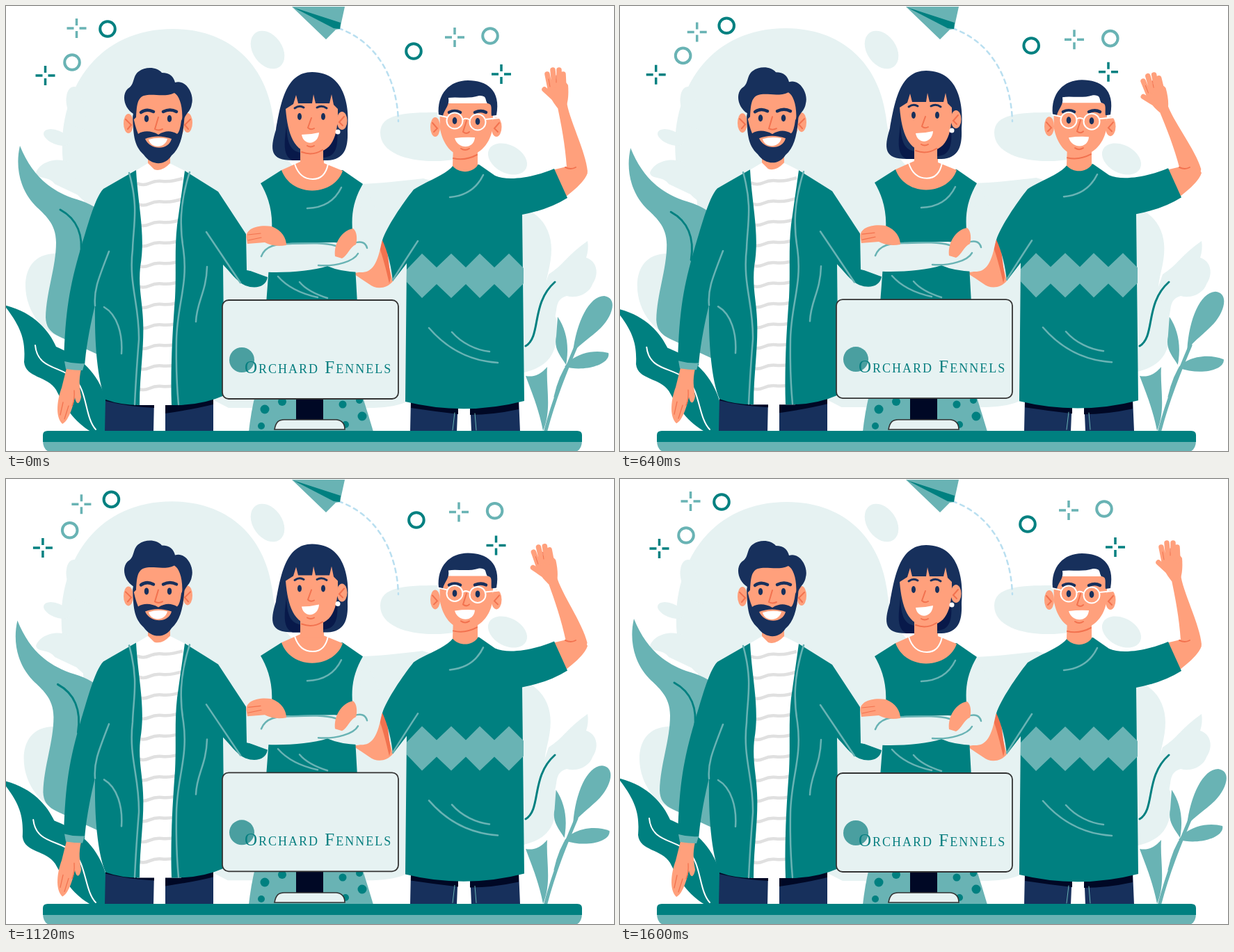
Write an HTML page that moves like this. It is 874x640 px and loops after 2.48 s.

```html
<!DOCTYPE html>
<html lang="en">
<head>
<meta charset="utf-8">
<title>Team</title>
<style>
html, body { margin: 0; width: 874px; height: 640px; overflow: hidden; background: #fff }
svg { display: block }
.teal { fill: #008080 } .mint { fill: #69b3b4 } .pale { fill: #e6f2f2 } .navy { fill: #17305c }
.dark { fill: #000825 } .skin { fill: #ffa07c } .blush { fill: #f2724f } .white { fill: #fff }
.line { fill: none; stroke: #69b3b4; stroke-width: 2.5; stroke-linecap: round }
.line.deep { stroke: #008080; stroke-width: 3 }
.line.light { stroke: #fff; stroke-width: 2 }
.line.warm { stroke: #f2724f; stroke-width: 2 }
.line.brow { stroke: #17305c; stroke-width: 4.5 }
.line.finger { stroke: #ffa07c; stroke-width: 7.5 }
text { font: 25px "Liberation Serif", serif; font-variant: small-caps; letter-spacing: 2px; fill: #087f80 }
</style>
</head>
<body>
<!-- data-move: dx dy angle pivotX pivotY at full swing -->
<svg width="874" height="640" viewBox="0 0 874 640">
<g class="pale">
  <path data-move="-2 -1.2" d="M82 225C72 130 125 33 240 33C322 33 374 85 384 160C395 270 480 262 600 248L742 290C772 300 784 325 784 350C784 375 774 395 776 410L791 450C794 490 789 516 745 527L574 570Q555 578 520 578H320L130 480L112 280Q88 262 82 225Z"/>
  <path data-move="-4 0" d="M72 356C40 356 28 378 28 402C28 440 55 474 88 478L110 350Z"/>
  <path d="M88 170C96 160 84 145 87 130C89 112 105 113 106 124L120 180Z"/>
  <ellipse cx="73" cy="189" rx="20" ry="10" transform="rotate(22 73 189)"/>
  <path d="M90 224C70 217 48 225 43 240C45 250 62 244 70 256L110 275Z"/>
  <ellipse cx="376" cy="63" rx="21" ry="30" transform="rotate(-35 376 63)"/>
  <path d="M538 182C538 155 575 153 620 153L650 220C600 229 538 219 538 182Z"/>
  <ellipse cx="721" cy="220" rx="30" ry="20" transform="rotate(28 721 220)"/>
  <path d="M836 338C807 358 802 372 780 386L772 410L789 448C793 435 789 422 806 417C825 422 840 410 843 400C853 386 850 367 834 362Q838 350 836 338Z"/>
</g>

<path class="line" d="M478 32C530 50 562 100 564 166" stroke-dasharray="6 6" style="stroke:#b9dff0"/>
<path class="mint" d="M411 1H487L480 33L474 34L460 48Z"/>
<path class="teal" d="M413 2L481 24L480 33L471 32Z"/>

<g id="icons"></g>

<g data-move="-6 4">
  <path class="mint" d="M20 201C37 243 62 264 95 276C115 282 130 288 140 300L138 504L112 492C78 474 58 474 57 448C58 410 72 376 72 340C72 312 55 300 42 287C20 264 13 232 20 201Z"/>
  <path class="line deep" d="M78 293C102 306 112 330 107 362"/>
</g>
<g data-move="0 0 -2.2 130 610">
  <path class="teal" d="M-3 430C40 440 62 467 72 490C95 500 150 525 150 612H122C97 597 85 577 72 552C60 532 28 535 26 512C28 485 25 465 -3 430Z"/>
  <path class="line light" d="M42 488C45 522 78 518 97 535C117 550 113 592 129 609"/>
</g>

<g class="mint">
  <path d="M747 532C762 535 772 526 778 519C776 548 785 580 772 611C766 580 756 556 747 532Z"/>
  <path data-move="-4 0" d="M793 447C806 466 810 490 805 516C798 504 787 494 791 475Z"/>
  <path class="line" style="stroke-width:5" d="M776 610C788 565 803 528 820 488M790 562Q797 532 810 514"/>
  <path data-move="0 -5 -4 818 492" d="M815 498C820 455 838 417 860 417C880 420 872 446 855 463C840 477 828 484 815 498Z"/>
  <path data-move="0 2 9 806 517" d="M803 519C815 500 845 493 866 499C870 514 835 527 803 519Z"/>
</g>
<path class="line deep" d="M747 489C770 475 754 428 789 397"/>

<!-- waving arm -->
<g data-move="0 0 -13.5 818 240">
  <path class="skin" d="M783 126L806 137C808 160 834 210 836 238Q833 248 820 255L800 240L806 232C804 200 798 170 793 146Z"/>
  <path class="skin" d="M778 112C781 104 802 102 808 114C809 126 808 136 806 142L793 147C786 138 779 128 778 112Z"/>
  <path class="line finger" d="M786 131L774 120M782 118L778 98M788 114L786 92M795 114L795 92M802 118L801 98"/>
  <path class="line warm" d="M782 116L780 105M791 110V100" style="stroke-width:1"/>
</g>
<path class="skin" d="M785 236L806 231Q830 225 836 240C832 253 815 266 800 278Z"/>
<path class="line warm" d="M804 232Q812 236 819 232"/>

<!-- man with glasses -->
<g data-move="0 -1">
  <path class="navy" d="M582 565H650L648 612H581ZM667 565H737L739 612H669Z"/>
  <path class="dark" d="M582 568H650V587Q615 583 582 578ZM667 568H737V580Q700 588 667 588Z"/>
  <path class="line" stroke="#5d7aa0" style="stroke-width:1" d="M645 585L642 610M674 586L676 610"/>
  <path class="skin" d="M498 384C520 384 532 370 541 336L556 396C547 407 532 408 522 400Z"/>
  <path class="blush" d="M541 337L547 344L553 391L551 399C546 377 541 359 537 348Z"/>
  <path class="teal" d="M643 229C633 243 604 252 586 264C570 284 547 318 541 337C549 354 554 376 556 396L576 370L574 569Q660 590 745 568L742 300Q780 293 807 276L788 234C760 246 722 253 703 244L680 228Z"/>
  <path class="mint" d="M576 379L598 356L619 376L640 356L661 376L681 356L702 376L723 356L744 377V399L723 420L702 400L681 420L661 400L640 420L619 400L598 420L576 397Z"/>
  <path class="line" d="M638 275Q672 272 686 243M608 463C640 500 675 511 707 513M641 469C655 485 676 495 695 497M592 338Q575 364 556 394"/>
  <path class="skin" d="M643 200H678V229C670 241 651 241 642 230Z"/>
  <path class="line warm" d="M643 219Q660 223 677 214"/>
  <ellipse class="skin" cx="617" cy="174" rx="7" ry="14"/>
  <ellipse class="skin" cx="705" cy="174" rx="7.5" ry="14"/>
  <path class="line warm" d="M613 168L620 176L615 181M709 168L702 176L707 181"/>
  <path class="skin" d="M623 140H701L699 178C695 201 677 216 661 216C640 216 628 198 624 177Z"/>
  <path class="navy" d="M622 157C619 126 638 107 664 107C691 107 712 121 705 157L698 158C697 148 700 141 692 140C688 134 692 129 680 129C665 134 648 130 636 132C638 144 630 148 628 158Z"/>
  <path class="line brow" d="M637 153Q645 149 653 153M674 153Q683 149 690 153"/>
  <ellipse class="navy" cx="645" cy="165" rx="3.3" ry="5"/>
  <ellipse class="navy" cx="678" cy="166" rx="3.3" ry="5"/>
  <path class="line warm" d="M662 165L657 181Q662 185 666 181M654 205Q660 209 666 205"/>
  <path class="white" d="M645 190Q660 188 674 189C673 206 650 207 645 190Z"/>
  <g class="line light"><circle cx="645" cy="165" r="11.5"/><circle cx="678" cy="167" r="11.5"/><path d="M657 163Q662 160 667 164M634 160L621 157M689 163L709 161"/></g>
</g>

<!-- bearded man -->
<g data-move="0 -1">
  <path class="navy" d="M143 565H213L212 612H142ZM229 565H298V612H229Z"/>
  <path class="dark" d="M143 565H213V578Q175 576 143 568ZM229 565H298V573Q270 580 229 586Z"/>
  <path class="white" d="M186 237L206 225L237 227L257 237L252 574H188Z"/>
  <g id="stripes" fill="none" stroke="#e0e0e0" stroke-width="4.5"></g>
  <path class="skin" d="M87 521L108 522C104 540 106 548 108 562C106 574 101 574 99 563C96 578 89 598 81 601C70 590 74 565 80 549Z"/>
  <path class="line warm" style="stroke-width:1.3" d="M98 553Q99 566 95 575M90 575L84 594M82 570L78 588"/>
  <path class="teal" d="M187 236L140 263C127 276 115 325 107 350C91 405 85 440 83 515L113 518C115 490 122 455 128 430C127 490 132 540 143 566Q165 574 192 574C192 530 199 490 197 452C196 425 190 405 193 375C201 330 190 290 187 236Z"/>
  <path class="teal" d="M257 237L305 267L345 328L346 379L376 390C374 403 360 408 344 402C331 396 322 382 312 372L314 560Q280 575 238 574C236 520 240 460 243 420C245 380 242 350 246 315Z"/>
  <path class="mint" d="M84 511Q98 515 113 514L110 524Q98 524 86 522Z"/>
  <path class="line" d="M177 240C191 290 183 315 182 350C176 400 192 430 191 480Q187 530 185 573M264 239C249 285 250 320 255 350C262 400 246 430 245 480Q244 530 248 573M148 353C133 392 126 408 128 431M288 325L337 398M289 375C288 412 274 425 273 454M141 433C160 444 168 472 166 500"/>
  <path class="skin" d="M204 205H236V226Q224 239 213 235L204 226Z"/>
  <ellipse class="skin" cx="176" cy="169" rx="7" ry="14"/>
  <ellipse class="skin" cx="261" cy="168" rx="7" ry="14"/>
  <path class="line warm" d="M172 163L180 171L175 177M265 163L257 171L262 177"/>
  <path class="skin" d="M182 125H255V180Q240 220 218 220T184 180Z"/>
  <path class="navy" d="M183 155C171 148 165 129 175 119C186 113 181 101 191 94C200 87 217 87 224 96C236 96 241 102 243 110C259 105 271 127 267 141C266 149 261 153 258 158L253 167C255 144 249 129 242 125C227 132 211 125 198 129C188 133 188 145 187 160L183 164Z"/>
  <path class="navy" d="M182 154C183 184 183 200 198 214C209 230 229 230 238 215C252 203 255 183 257 154L252 165Q250 181 246 184C237 179 229 179 219 185C209 179 197 179 190 184Q185 172 182 154Z"/>
  <path class="skin" d="M200 191Q218 184 238 191C234 208 207 208 200 191Z"/>
  <path class="white" d="M205 192Q218 188 232 191C228 206 208 205 205 192Z"/>
  <path class="line brow" d="M194 153Q202 147 212 152M226 152Q236 147 245 152"/>
  <ellipse class="navy" cx="202" cy="162" rx="3.2" ry="5"/>
  <ellipse class="navy" cx="235" cy="162" rx="3.2" ry="5"/>
  <path class="line warm" d="M219 160L214 177Q219 180 225 177"/>
</g>

<!-- woman -->
<path class="mint" d="M358 560H512Q520 585 528 612H349Q352 585 358 560Z"/>
<g class="teal"><circle cx="372" cy="580" r="6.5"/><circle cx="397" cy="569" r="6"/><circle cx="367" cy="604" r="5"/><circle cx="484" cy="573" r="5.5"/><circle cx="488" cy="602" r="5"/><circle cx="512" cy="590" r="6.5"/><circle cx="508" cy="567" r="5"/></g>
<g data-move="0 -1.2">
  <path class="teal" d="M366 255L396 236H484L513 256C497 283 495 308 500 338L505 428H374L382 322C384 293 375 270 366 255Z"/>
  <path class="skin" d="M396 236L423 224V205H457V226L484 237C472 273 411 277 396 236Z"/>
  <path class="line" d="M433 291Q468 290 482 261M391 389C405 405 425 414 448 419M422 397C432 409 446 415 462 420"/>
  <path class="pale" d="M346 339Q370 345 402 341L472 340L505 343L513 256Q540 300 541 334C534 375 525 384 508 383Q480 382 462 374C432 384 375 385 346 380Z"/>
  <path class="line" d="M367 360C373 344 390 342 408 342C437 341 458 340 474 345M449 373C475 375 500 367 506 356M500 341Q516 336 519 348"/>
  <path class="skin" d="M346 336C342 320 362 314 382 317C397 323 403 334 403 344Q385 347 372 340L347 342Z"/>
  <path class="line warm" style="stroke-width:1.2" d="M348 329L366 327M348 337L367 333"/>
  <path class="skin" d="M473 360C471 342 482 323 499 320C505 324 505 337 503 343C494 347 491 359 483 363Z"/>
</g>
<g data-move="0 -2.5">
  <path class="navy" d="M440 95C402 95 395 140 388 178C379 207 380 222 412 222H462C486 221 492 205 491 180C494 150 490 95 440 95Z"/>
  <path class="dark" style="fill:#08194a" d="M403 170C404 200 410 208 423 211V222H412C395 215 402 188 403 170ZM456 203L476 178C478 205 473 217 456 218Z"/>
  <path class="skin" d="M423 200H456V229H423Z"/>
  <ellipse class="skin" cx="483" cy="165" rx="7.5" ry="13"/>
  <path class="line warm" d="M486 159L479 167L484 172"/>
  <path class="skin" d="M402 148L413 141L417 128L420 140H440L442 127L445 140H465L468 127L471 142L477 148C478 190 467 211 441 211C414 211 405 184 402 148Z"/>
  <path class="line warm" d="M425 210Q441 216 455 207M439 161L434 175Q438 179 443 176M433 201Q438 204 443 201"/>
  <path class="line brow" style="stroke-width:3" d="M415 147Q422 142 428 146M447 146Q454 142 461 147"/>
  <ellipse class="navy" cx="422" cy="159" rx="3" ry="5"/>
  <ellipse class="navy" cx="456" cy="159" rx="3" ry="5"/>
  <path class="white" d="M425 185Q438 185 450 182C449 200 428 202 425 185Z"/>
  <circle class="white" cx="477" cy="181" r="3.5"/>
</g>
<path class="line light" data-move="0 -1.5" d="M415 227C420 243 429 249 441 249C453 249 460 242 463 227"/>

<!-- desk and monitor -->
<rect class="dark" x="417" y="562" width="39" height="36"/>
<path class="pale" d="M386 609C388 598 392 595 400 595H475C483 596 487 600 487 609Z" stroke="#333" stroke-width="1.6"/>
<g data-move="0 -1.2">
  <rect class="pale" x="311" y="423" width="253" height="142" rx="9" stroke="#333" stroke-width="1.8"/>
  <circle cx="339" cy="509" r="18" fill="#4a9fa0"/>
  <text x="343" y="528">Orchard Fennels</text>
</g>
<path class="mint" d="M53 624H828Q828 638 819 641H62Q53 638 53 624Z"/>
<path class="teal" d="M53 627V617Q53 611 60 611H821Q828 611 828 617V627Z"/>
</svg>
<script>
const LOOP = 2480, SWING = 800, STEP = 80;

// kind, x, y, colour, drift x, drift y
const icons = [
  ['plus', 101.5, 32, '#69b3b4', 11.5, 7], ['ring', 146, 33, '#008080', 9, -6],
  ['ring', 95, 81, '#69b3b4', -5.5, -12], ['plus', 56.5, 100, '#008080', -6, -1.5],
  ['ring', 586, 65, '#008080', 6.5, -10], ['plus', 645, 45, '#69b3b4', 10, 4],
  ['ring', 696, 43, '#69b3b4', 11, 4.5], ['plus', 712, 98, '#008080', -12.5, -4]
];
const shapes = {
  plus: (x, y) => `<path d="M${x - 14} ${y}h10m8 0h10M${x} ${y - 14}v10m0 8v10"/>`,
  ring: (x, y) => `<circle cx="${x}" cy="${y}" r="10.8"/>`
};
document.getElementById('icons').innerHTML = icons.map(([kind, x, y, colour, dx, dy]) =>
  `<g data-move="${dx} ${dy}" fill="none" stroke="${colour}" stroke-width="${kind === 'ring' ? 4 : 3.5}">${shapes[kind](x, y)}</g>`).join('');

document.getElementById('stripes').innerHTML = Array.from({ length: 11 }, (_, i) =>
  `<path d="M188 ${255 + i * 29.5}q9 4 18 0t18 -3t18 -1t12 -3"/>`).join('');

const parts = [...document.querySelectorAll('[data-move]')].map(el => [el, el.dataset.move.split(' ').map(Number)]);

function draw() {
  const t = Math.floor(performance.now() % LOOP / STEP) * STEP;
  const p = Math.max(0, 1 - Math.abs(t - SWING) / SWING);
  for (const [el, [dx, dy, angle = 0, cx = 0, cy = 0]] of parts)
    el.setAttribute('transform', `translate(${dx * p} ${dy * p}) rotate(${angle * p} ${cx} ${cy})`);
  requestAnimationFrame(draw);
}
draw();
</script>
</body>
</html>
```
